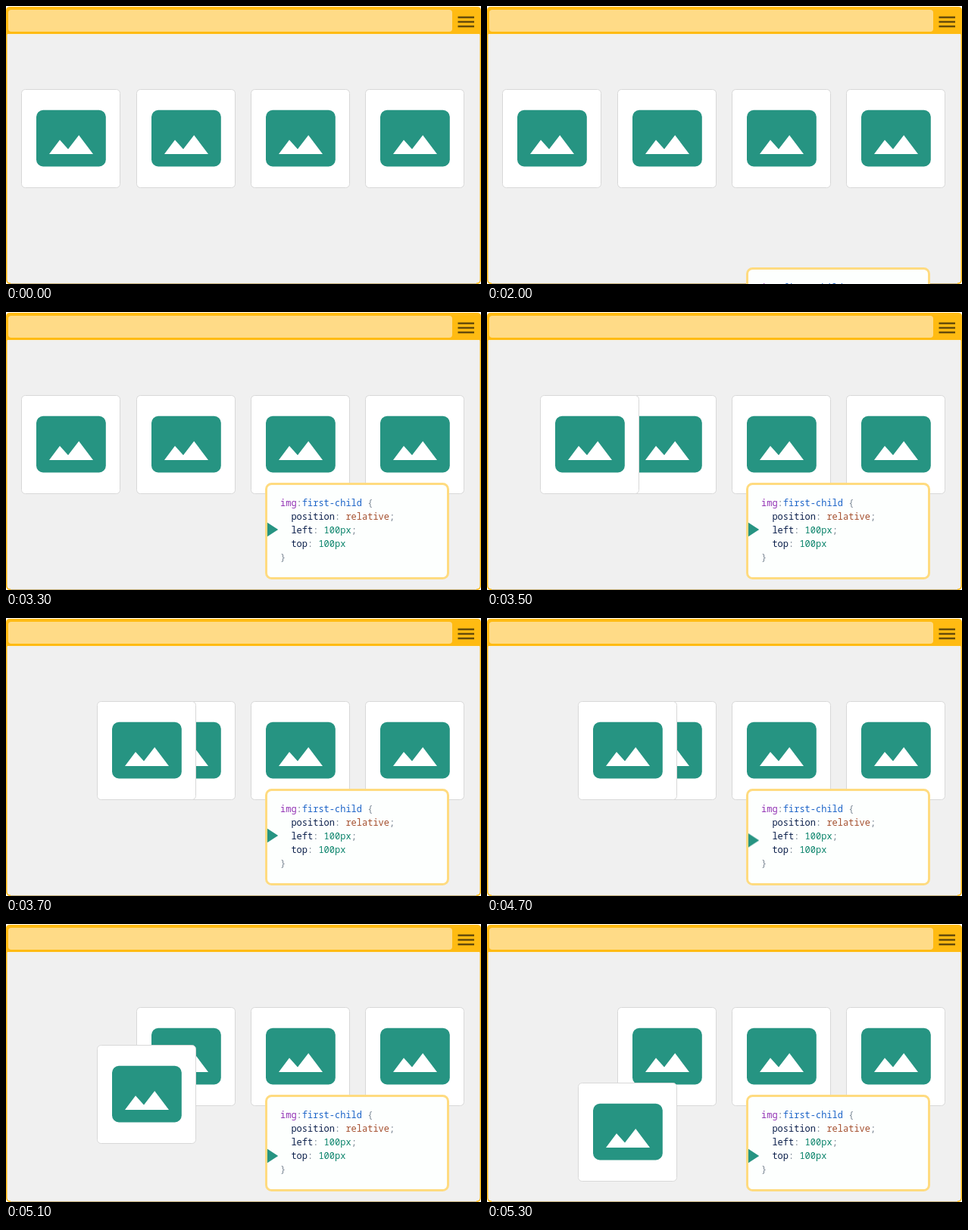
Recreate the animation shown at these times as an HTML page. Size 627 by 368 pixels, loop 7300 ms.

```html
<!DOCTYPE html>
<html lang="en">
<head>
<meta charset="utf-8">
<title>Relative positioning</title>
<style>
  html, body { margin: 0; width: 100%; height: 100%; overflow: hidden; background: #fff; }
  svg { display: block; width: 627px; height: 368px; }

  .bar { fill: #ffbb12; }
  .address { fill: #ffdb87; }
  .menu { stroke: #654b0b; stroke-width: 2.3; }
  .frame { fill: none; stroke: #ffbb12; stroke-width: 1.5; }
  .paper { fill: #fff; stroke: #d8d8d8; }
  .green { fill: #269482; }
  .box { fill: #fdfffe; stroke: #ffdb80; stroke-width: 3; }

  text { font: 12px "Noto Sans Mono", "DejaVu Sans Mono", monospace; fill: #7b8794; white-space: pre; }
  .tag { fill: #9130b4; }
  .pseudo { fill: #1c64c8; }
  .prop { fill: #0b1f4b; }
  .word { fill: #a5502f; }
  .num { fill: #09836a; }

  /* 7.3 s loop, moving in 100 ms ticks */
  .panel, .first, .arrow { animation: 7.3s linear infinite; }
  .panel { animation-name: rise; }
  .first { animation-name: shift; }
  .arrow { animation-name: point; }

  @keyframes rise {
    0% { transform: translateY(160px); }
    27.397% { transform: translateY(160px); animation-timing-function: steps(4, jump-start); }
    32.876%, 100% { transform: translateY(0); }
  }
  @keyframes shift {
    0% { transform: translate(0, 0); }
    46.575% { transform: translate(0, 0); animation-timing-function: steps(4, jump-start); }
    52.054% { transform: translate(100px, 0); }
    68.493% { transform: translate(100px, 0); animation-timing-function: steps(4, jump-start); }
    73.972%, 100% { transform: translate(100px, 100px); }
  }
  @keyframes point {
    0% { opacity: 0; transform: translateY(0); animation-timing-function: step-end; }
    45.205% { opacity: 1; transform: translateY(0); }
    64.383% { opacity: 1; transform: translateY(0); animation-timing-function: steps(3, jump-start); }
    68.493%, 100% { opacity: 1; transform: translateY(19px); }
  }
</style>
</head>
<body>
<svg viewBox="0 0 627 368" xmlns="http://www.w3.org/2000/svg">
  <defs>
    <g id="card">
      <rect class="paper" x=".5" y=".5" width="130" height="130" rx="5"/>
      <rect class="green" x="20" y="27.8" width="91.8" height="74.6" rx="9"/>
      <path fill="#fff" d="M37 86L51 67.2L62 79.5L76.2 61L95 86Z"/>
    </g>
  </defs>

  <rect x=".5" y="1" width="626" height="367" rx="5" fill="#f0f0f0"/>
  <path class="bar" d="M0 38V6Q0 1 5 1H622Q627 1 627 6V38Z"/>
  <rect x="1.5" y="37" width="624" height="1.5" fill="#f4f1e8"/>
  <rect class="address" x="3" y="5" width="586" height="29" rx="4"/>
  <path class="menu" d="M596.5 15H618M596.5 21H618M596.5 27H618"/>
  <path d="M5 367.5H622" stroke="#c4ae78"/>
  <path class="frame" d="M.75 37V362Q.75 367.3 6 367.3M621 367.3Q626.25 367.3 626.25 362V37"/>

  <use href="#card" x="172" y="110"/>
  <use href="#card" x="323" y="110"/>
  <use href="#card" x="474" y="110"/>
  <g class="first"><use href="#card" x="20" y="110"/></g>

  <g class="panel">
    <rect class="box" x="343.5" y="227.5" width="240" height="125" rx="7"/>
    <text x="362" y="257"><tspan class="tag">img</tspan>:<tspan class="pseudo">first-child</tspan> {</text>
    <text x="376.4" y="275"><tspan class="prop">position</tspan>: <tspan class="word">relative</tspan>;</text>
    <text x="376.4" y="293"><tspan class="prop">left</tspan>: <tspan class="num">100px</tspan>;</text>
    <text x="376.4" y="311"><tspan class="prop">top</tspan>: <tspan class="num">100px</tspan></text>
    <text x="362" y="329">}</text>
  </g>
  <path class="green arrow" d="M345 278.8L359.2 288L345 297.2Z"/>
</svg>
</body>
</html>
```
